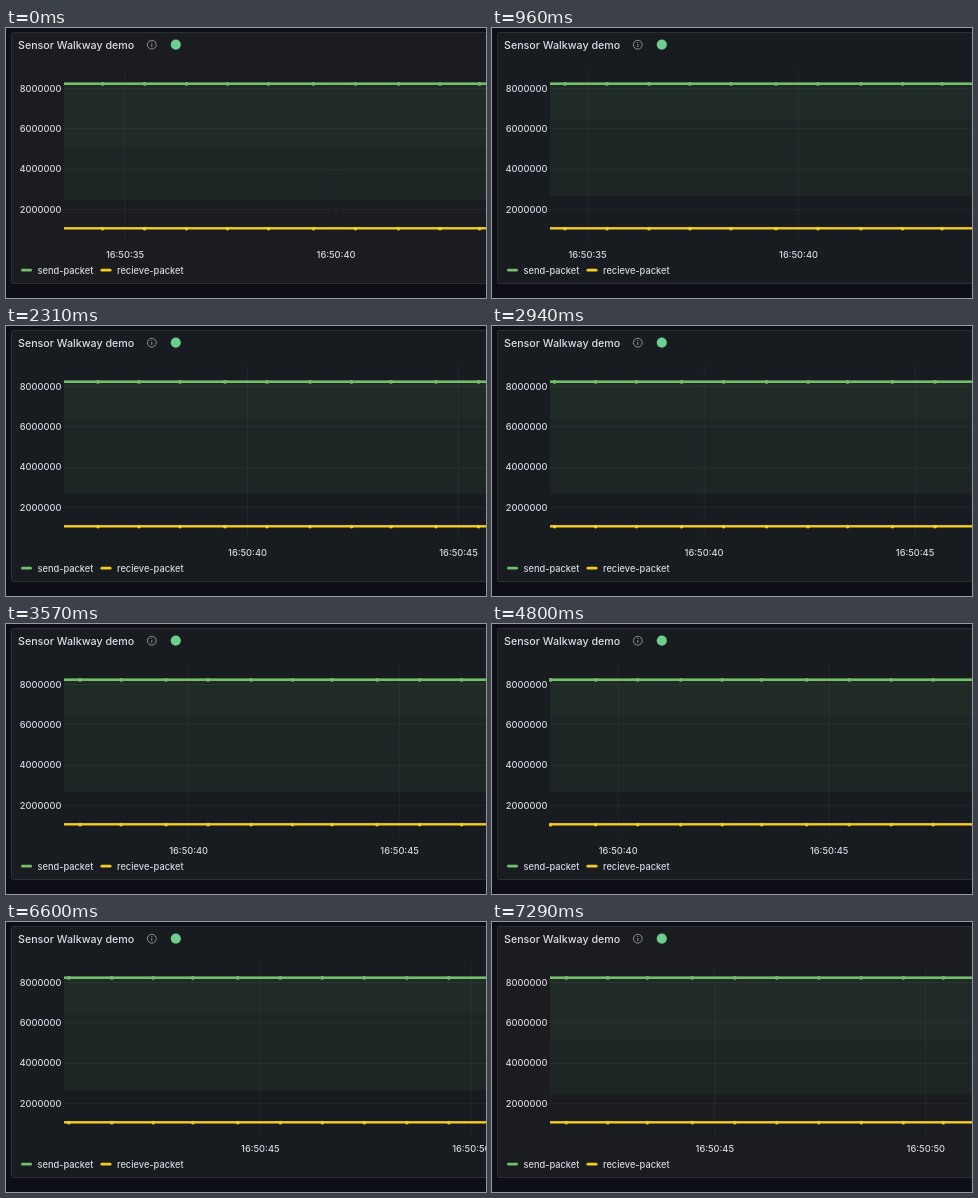
Recreate the animation shown at these times as an HTML page. Size 480 by 270 pixels, loop 7740 ms.

```html
<!DOCTYPE html>
<html lang="en">
<head>
<meta charset="utf-8">
<title>Packet chart</title>
<style>
  html, body { margin: 0; width: 100%; height: 100%; overflow: hidden; background: #0e0f16; }
  svg { display: block; width: 480px; height: 270px; }
  text { font: 500 9.25px Inter, "Open Sans", sans-serif; fill: #d6d7e0; }
  .title { font-size: 10.7px; fill: #dcdde6; }
  .end { text-anchor: end; }
  .mid { text-anchor: middle; }
  .grid { stroke: #ccccdc; stroke-opacity: .055; }
  .send { fill: #73bf69; }
  .receive { fill: #f5cd22; }
</style>
</head>
<body>
<svg viewBox="0 0 480 270">
  <defs><clipPath id="plot"><rect x="57" y="40" width="423" height="176"/></clipPath></defs>
  <rect id="panel" x="5.5" y="4.5" width="490" height="251" rx="1" stroke="#2b2d33"/>
  <text class="title" x="12" y="20.5">Sensor Walkway demo</text>
  <g fill="none" stroke="#8f909a">
    <circle cx="145.8" cy="16.7" r="4.4"/>
    <path d="M145.8 16v3M145.8 14v1"/>
  </g>
  <circle cx="169.8" cy="16.6" r="5.1" fill="#6ccf8e"/>

  <rect id="upper" x="58" y="56" width="422" fill="#202a27"/>
  <rect id="lower" x="58" width="422" fill="#1e2525"/>
  <g id="axis"></g>
  <g clip-path="url(#plot)"><g id="lines"></g></g>
  <rect class="send" x="58" y="54.4" width="422" height="2.6"/>
  <rect class="receive" x="58" y="199.1" width="422" height="2.4"/>
  <g clip-path="url(#plot)"><g id="dots"></g></g>
  <g id="times"></g>

  <rect class="send" x="15" y="240.8" width="11" height="2.8" rx="1.4"/>
  <text x="31.5" y="245.5">send-packet</text>
  <rect class="receive" x="94.5" y="240.8" width="11" height="2.8" rx="1.4"/>
  <text x="111" y="245.5">recieve-packet</text>
</svg>
<script>
const LOOP = 7740, STEP = 30, START = 450, END = 7290;
const LEFT = 58, FIRST_TICK = 119, TICK_GAP = 211;
// Sample positions relative to the first tick; they arrive slightly unevenly.
const samples = [-22.5, 19.5, 61.5, 102.5, 143.5, 188.5, 230.5, 273.5, 315,
  354.5, 399.5, 442, 484, 526, 568.5, 610.5, 650.5];
// Time in ms and distance scrolled in px.
const scroll = [[450, 0], [960, 23.5], [2310, 88.5], [3570, 147.4],
  [4800, 203.8], [5880, 253.8], [7290, 318.2]];

const $ = id => document.getElementById(id);

function add(parent, tag, attrs, text = "") {
  const el = document.createElementNS("http://www.w3.org/2000/svg", tag);
  for (const name in attrs) el.setAttribute(name, attrs[name]);
  el.textContent = text;
  return parent.appendChild(el);
}

[60.5, 100.7, 141, 181.2].forEach((y, i) => {
  const line = Math.floor(y) + .5;
  add($("axis"), "line", { class: "grid", x1: LEFT, x2: 480, y1: line, y2: line });
  add($("axis"), "text", { class: "end", x: 55.4, y: y + 3.3 }, String(8000000 - i * 2000000));
});

const ticks = [35, 40, 45, 50].map((second, i) => {
  const x = FIRST_TICK + i * TICK_GAP;
  add($("lines"), "line", { class: "grid", x1: x, x2: x, y1: 41, y2: 213 });
  return { x, label: add($("times"), "text", { class: "mid", x, y: 230 }, "16:50:" + second) };
});

for (const s of samples) {
  add($("dots"), "circle", { class: "send", cx: FIRST_TICK + s, cy: 55.9, r: 1.9 });
  add($("dots"), "circle", { class: "receive", cx: FIRST_TICK + s, cy: 200.6, r: 1.9 });
}

function distance(t) {
  t = Math.min(END, Math.max(START, t));
  if (t > 570 && t < 780) t = 570; // brief stall, then catch up
  const i = Math.max(1, scroll.findIndex(([time]) => time >= t));
  const [t0, d0] = scroll[i - 1], [t1, d1] = scroll[i];
  return d0 + (d1 - d0) * (t - t0) / (t1 - t0);
}

function draw(now) {
  const t = Math.floor(now % LOOP / STEP) * STEP;
  const dx = -distance(t);
  for (const id of ["lines", "dots", "times"]) $(id).setAttribute("transform", `translate(${dx})`);
  for (const { x, label } of ticks) label.setAttribute("visibility", x + dx < LEFT ? "hidden" : "visible");

  const still = t < START || t >= END;
  const split = still ? 119 : 92, base = still ? 172 : 168;
  $("panel").setAttribute("fill", still ? "#1b1c20" : "#181b1f");
  $("upper").setAttribute("height", split - 56);
  $("lower").setAttribute("y", split);
  $("lower").setAttribute("height", base - split);
}

const begin = performance.now();
function frame() {
  draw(performance.now() - begin);
  requestAnimationFrame(frame);
}
frame();
</script>
</body>
</html>
```
